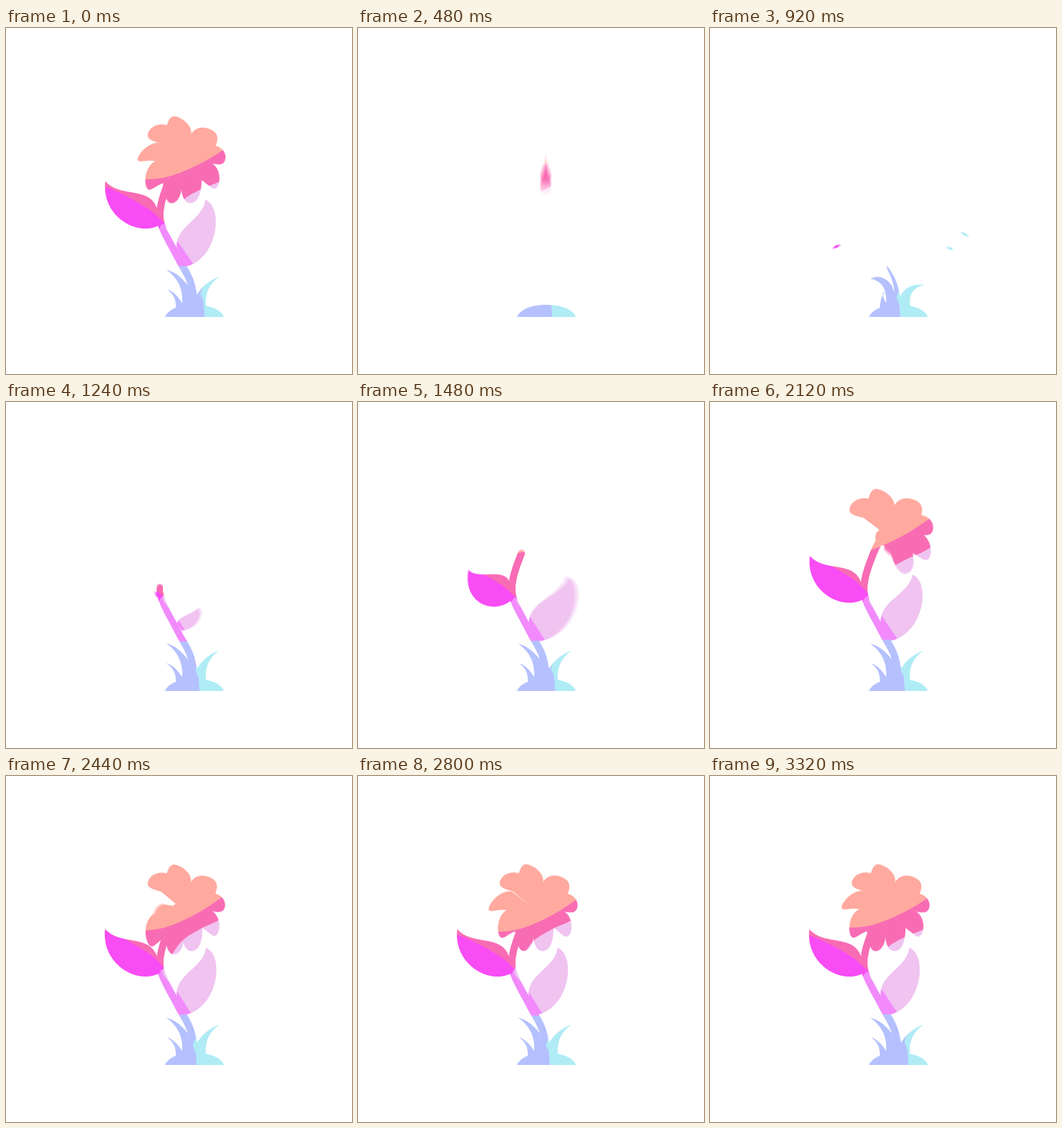
An HTML page with a canvas that plays this animation: 540x540 px, repeating every 3360 ms.

```html
<!DOCTYPE html>
<html lang="en">
<head>
<meta charset="utf-8">
<title>Growing flower</title>
<style>
  html, body { margin: 0; width: 100%; height: 100%; overflow: hidden; background: #fff; }
  canvas { display: block; width: 540px; height: 540px; }
</style>
</head>
<body>
<canvas id="stage" width="540" height="540"></canvas>
<script>
const SIZE = 540, LOOP = 3360, STEP = 40, SHUTTER = 20, SAMPLES = 8;
const GROUND = 451, IMPACT = 600, SWAY = 1680;
const out = document.getElementById('stage').getContext('2d');
const layer = document.createElement('canvas');
layer.width = layer.height = SIZE;
const g = layer.getContext('2d');

// ---------- helpers ----------
const clamp = v => Math.max(0, Math.min(1, v));
const lerp = (a, b, k) => a + (b - a) * k;
const mix = (a, b, k) => a.map((v, i) => lerp(v, b[i], k));
const add = (a, b, k = 1) => [a[0] + b[0] * k, a[1] + b[1] * k];
const sub = (a, b) => add(a, b, -1);
const dot = (a, b) => a[0] * b[0] + a[1] * b[1];

// damped swing from 1 to rest at 0
const wobble = (age, decay, period) =>
  age < 0 ? 1 : Math.exp(-age * decay) * Math.cos(2 * Math.PI * age / period);

// every part folds away before the impact and grows after it
const amount = (t, foldAt, foldTime, growAt, growTime) =>
  t < IMPACT ? 1 - clamp((t - foldAt) / foldTime) : clamp((t - growAt) / growTime);

function splinePoint(pts, u) {
  const i = Math.min(pts.length - 2, Math.floor(u)), f = u - i;
  const p = pts[i], q = pts[i + 1], a = pts[i - 1] || p, b = pts[i + 2] || q;
  return [0, 1].map(k => p[k] + 0.5 * f * (q[k] - a[k] + f * (2 * a[k] - 5 * p[k] + 4 * q[k] - b[k] +
    f * (3 * (p[k] - q[k]) + b[k] - a[k]))));
}

function about([x, y], scale, angle, draw) {
  if (scale <= 0) return;
  g.save();
  g.translate(x, y);
  g.rotate(angle * Math.PI / 180);
  g.scale(scale, scale);
  g.translate(-x, -y);
  draw();
  g.restore();
}

// ---------- colour bands ----------
// edge at rest; head and tail give [dx, dy, phase] of the sway at its two ends
const BANDS = [
  { color: '#ffa99f', edge: [[0, 0], [540, 0]], close: [[540, 540], [0, 540]],
    head: [0, 0, 0], tail: [0, 0, 0] },
  { color: '#f86cb4', edge: [[150, 229], [216, 239], [270, 228], [340, 189], [420, 118]],
    close: [[540, 540], [0, 540], [0, 222]], head: [0, 3.4, 200], tail: [0, 6, 300] },
  { color: '#f84cf5', edge: [[100, 232], [154, 245], [190, 261], [225, 282], [246, 301], [262, 316]],
    close: [[262, 540], [0, 540], [0, 230]], head: [0, 6, 300], tail: [0, 3.5, 305] },
  { color: '#f28afc', edge: [[264, 288], [247, 302], [238, 313], [215, 375]],
    close: [[215, 540], [400, 540], [400, 288]], head: [0, 2.5, 0], tail: [0, 2.5, 0] },
  { color: '#f0c3f1', edge: [[400, 190], [338, 229], [305, 244], [275, 263], [254, 294], [247, 311], [266, 333],
    [290, 369], [317, 407]], close: [[540, 405], [540, 190]], head: [0, 9.6, 12], tail: [5, 0, 45] },
  { color: '#b5c1fe', edge: [[150, 383], [250, 376], [272, 377], [284, 372.5], [450, 386]],
    close: [[450, 540], [150, 540]], head: [0, 1.5, 240], tail: [0, 1.5, 240] },
  { color: '#b0ecf6', edge: [[362, 250], [338, 360], [300, 410], [302, 430], [303.8, 454]],
    close: [[303, 540], [540, 540], [540, 250]], head: [6.4, -3, 9], tail: [6.4, -3, 9] }
];

function paintBands(t) {
  out.globalCompositeOperation = 'source-atop';
  for (const { color, edge, close, head, tail } of BANDS) {
    const last = edge.length - 1;
    const pts = edge.map((p, i) => {
      const [dx, dy, phase] = mix(head, tail, i / last);
      return add(p, [dx, dy], Math.cos(2 * Math.PI * (t / SWAY - phase / 360)));
    });
    out.fillStyle = color;
    out.beginPath();
    for (let i = 0; i <= last * 10; i++) out.lineTo(...splinePoint(pts, i / 10));
    close.forEach(p => out.lineTo(...p));
    out.fill();
  }
  out.globalCompositeOperation = 'source-over';
}

// ---------- ground, drop and splash ----------
function mound() {
  g.beginPath();
  g.moveTo(248, GROUND);
  g.bezierCurveTo(254, 437, 275, 432, 293, 432);
  g.bezierCurveTo(313, 432, 335, 437, 340, GROUND);
  g.fill();
}

function drop(t) {
  if (t > IMPACT) return;
  const y = -132 + 0.00142 * t * t;
  g.beginPath();
  g.moveTo(293, y);
  g.bezierCurveTo(295, y + 14, 302, y + 23, 302, y + 33);
  g.arc(293, y + 33, 9, 0, Math.PI);
  g.bezierCurveTo(284, y + 23, 291, y + 14, 293, y);
  g.fill();
}

// vx, vy, gravity per ms
const SPLASH = [[0.328, -0.8875, 0.0034], [0.256, -0.659, 0.0024], [-0.3, -0.7, 0.0026]];

function splash(t) {
  const age = t - IMPACT;
  if (age < 0 || age > 440) return;
  g.lineWidth = 4 * Math.min(2, (440 - age) / 120);
  for (const [vx, vy, a] of SPLASH) {
    const at = s => [293 + vx * s, 432 + vy * s + a * s * s / 2];
    g.beginPath();
    g.moveTo(...at(age));
    g.lineTo(...at(Math.max(0, age - 20)));
    g.stroke();
  }
}

// ---------- grass ----------
// sag: how far the tip hangs while the blade is still curled
const BLADES = [
  { root: [275, 429], under: [277, 396], tip: [250, 377], over: [269, 382], end: [284, 402], sag: [0, 15] },
  { root: [265, 437], under: [266, 417], tip: [251, 408], over: [264, 411], end: [276, 431], sag: [24, 5] },
  { root: [297, 418], under: [309, 397], tip: [333, 388], over: [309, 405], end: [312, 434], sag: [3, 14] }
];

function grass(t) {
  const h = amount(t, 160, 200, 640, 220);
  if (!h) return;
  const curl = t < IMPACT ? 0 : wobble(t - 920, 0.006, 480);
  const foot = 446;
  const low = ([x, y]) => [x, lerp(foot, y, h)];
  for (const { root, under, tip, over, end, sag } of BLADES) {
    const hung = low(add(tip, sag, curl));
    g.beginPath();
    g.moveTo(...low(root));
    g.quadraticCurveTo(...low(under), ...hung);
    g.quadraticCurveTo(...low(over), ...low(end));
    g.lineTo(end[0] + 14, foot);
    g.lineTo(root[0], foot);
    g.fill();
  }
}

// ---------- stem ----------
const STEM = [[294, 451], [289, 400], [268, 358], [243, 308], [242, 276], [256, 234], [268, 211]];

function stem(t) {
  const x = amount(t, 100, 220, 680, 1040);
  const len = (STEM.length - 1) * (1 - (1 - x) ** 1.15);
  if (len <= 0) return;
  const taper = t < IMPACT ? 1 : lerp(0.25, 1, clamp((t - 920) / 400));
  const n = Math.ceil(len * 12);
  for (let i = 1; i <= n; i++) {
    const u = len * i / n;
    g.lineWidth = (11 + 18 * Math.max(0, 1 - u) ** 2) * lerp(1, taper, i / n);
    g.beginPath();
    g.moveTo(...splinePoint(STEM, len * (i - 1) / n));
    g.lineTo(...splinePoint(STEM, u));
    g.stroke();
  }
}

// ---------- leaves ----------
// outline: base, two controls, tip, two controls, end
const LEAVES = [
  { start: 1200, droop: [18, 24],
    outline: [[246, 303], [214, 331], [148, 298], [155, 239], [178, 266], [224, 246], [236, 282]] },
  { start: 1145, droop: [44, 12],
    outline: [[267, 346], [261, 310], [308, 300], [311, 268], [341, 280], [330, 364], [278, 373]] }
];

function leaves(t) {
  for (const { start, droop, outline } of LEAVES) {
    const [base, , , tip] = outline;
    const bend = t < IMPACT ? 0 : wobble(t - start - 280, 0.003, 360);
    const reach = p => Math.hypot(...sub(p, base)) / Math.hypot(...sub(tip, base));
    const p = outline.map(q => add(q, droop, bend * Math.min(1, reach(q)) ** 1.5));
    about(base, amount(t, 60, 160, start, 280), 0, () => {
      g.beginPath();
      g.moveTo(...p[0]);
      g.bezierCurveTo(...p[1], ...p[2], ...p[3]);
      g.bezierCurveTo(...p[4], ...p[5], ...p[6]);
      g.fill();
    });
  }
}

// ---------- flower ----------
const HEART = [272, 205];
const TIPS = [[222, 164], [270, 140], [318, 158], [342, 205], [330, 247], [288, 273], [260, 273], [219, 247], [206, 203]];
// NOTCHES[i] lies just before TIPS[i], clockwise
const NOTCHES = [[242, 180], [251, 152], [288, 168], [327, 184], [321, 211], [305, 237], [273, 237], [245, 242], [234, 208]];

function petal(a, tip, b) {
  const chord = sub(b, a), normal = [chord[1], -chord[0]];
  const rise = 0.55 * dot(sub(tip, a), normal) / dot(normal, normal);
  g.beginPath();
  g.moveTo(...HEART);
  g.lineTo(...a);
  g.bezierCurveTo(...add(a, normal, rise), ...add(tip, chord, -0.36), ...tip);
  g.bezierCurveTo(...add(tip, chord, 0.36), ...add(b, normal, rise), ...b);
  g.closePath();
  g.fill();
  g.lineWidth = 0.5;
  g.stroke();
}

function flower(t) {
  const early = t < IMPACT;
  TIPS.forEach((tip, i) => {
    const age = t - 1680 - 10.3 * i * i;
    const scale = early ? amount(t, 30, 150) : 1 - wobble(age, 0.0068, 720);
    const turn = early ? 0 : -65 * Math.exp(-age / 140);
    about(HEART, scale, turn, () => petal(NOTCHES[i], tip, NOTCHES[(i + 1) % TIPS.length]));
  });
  g.beginPath();
  g.arc(271, 211, 13 * amount(t, 30, 150, 1700, 160), 0, 7);
  g.fill();
}

// ---------- frame ----------
function silhouette(t) {
  g.clearRect(0, 0, SIZE, SIZE);
  g.lineCap = 'round';
  [mound, drop, splash, grass, stem, leaves, flower].forEach(part => part(t));
  g.clearRect(0, GROUND, SIZE, SIZE - GROUND);
}

// average several moments of the shutter for motion blur, then tint
function render(t) {
  out.clearRect(0, 0, SIZE, SIZE);
  out.globalCompositeOperation = 'lighter';
  out.globalAlpha = 1 / SAMPLES;
  for (let i = 0; i < SAMPLES; i++) {
    silhouette(t + SHUTTER * i / SAMPLES);
    out.drawImage(layer, 0, 0);
  }
  out.globalAlpha = 1;
  paintBands(t);
}

let start = null, shown = 0;
function tick(now) {
  if (start === null) start = now;
  const t = Math.floor(Math.max(0, now - start) % LOOP / STEP) * STEP;
  if (t !== shown) render(shown = t);
  requestAnimationFrame(tick);
}
render(0);
requestAnimationFrame(tick);
</script>
</body>
</html>
```
